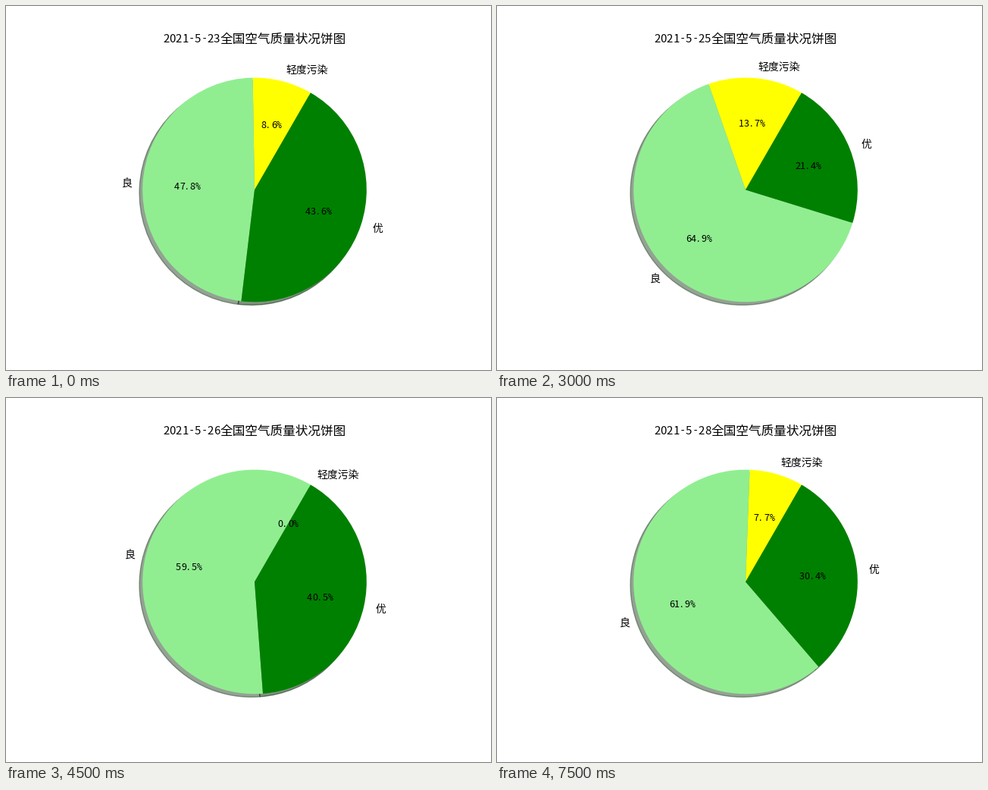
These frames come from a looping animation (640x480 px, 8000 ms). A matplotlib script:

```python
import matplotlib.pyplot as plt
from matplotlib.animation import FuncAnimation
from matplotlib.transforms import IdentityTransform

W, H, DPI = 640, 480, 100
CJK = "Noto Sans CJK JP"
MONO = "DejaVu Sans Mono"
TITLE = "全国空气质量状况饼图"
LABELS = ["轻度污染", "良", "优"]
COLORS = ["yellow", "lightgreen", "green"]

# Percent per day; the rest of each day is rated excellent
POLLUTED = [8.59, 17.86, 13.69, 0, 10.71, 7.74]
GOOD = [47.85, 66.67, 64.88, 59.52, 60.71, 61.9]
FIRST_DAY = 23

STEP = 500
FRAMES = 16
HOLD = 3  # steps each day stays on screen

# Pie centre and radius in pixels, from the default axes box
CX, CY, R = 0.5125 * W, 0.495 * H, 0.77 * H / 2.5

fig, ax = plt.subplots(figsize=(W / DPI, H / DPI), dpi=DPI)


def em(size):
    return size * DPI / 72


def put(x, y, text, family, size, ha="left"):
    ax.text(x, y, text, family=family, size=size, ha=ha, va="baseline",
            transform=IdentityTransform())


def half_width(left, y, text, size):
    """Set each character in a cell half an em wide."""
    cell = em(size) / 2
    for k, ch in enumerate(text):
        x = left + k * cell
        if ch == ".":
            put(x, y, ch, CJK, size * 0.9)
        elif ch.isdigit():
            put(x + cell / 2, y, ch, CJK, size * 0.9, "center")
        else:
            put(x + cell / 2, y, ch, MONO, size * 0.83, "center")


def draw_title(day):
    date = f"2021-5-{day}"
    date_width = len(date) * em(12) / 2
    left = CX - (date_width + len(TITLE) * em(12)) / 2
    base = 0.88 * H + em(6) + 1
    half_width(left, base, date, 12)
    put(left + date_width, base, TITLE, CJK, 12)


def draw(i):
    n = i // HOLD
    bad, good = POLLUTED[n], GOOD[n]
    ax.clear()
    _, names, shares = ax.pie(
        [bad, good, 100 - bad - good], labels=LABELS, colors=COLORS,
        autopct="%.1f%%", startangle=60, shadow=True)
    for t in names:
        t.set(family=CJK, size=10, x=t.get_position()[0] + 1 / R)
    for t in shares:
        x, y = t.get_position()
        text = t.get_text()
        t.remove()
        half_width(CX + R * x - len(text) * em(10) / 4, CY + R * y - 4.6,
                   text, 10)
    draw_title(FIRST_DAY + n)


anim = FuncAnimation(fig, draw, frames=FRAMES, init_func=lambda: None,
                     interval=STEP, repeat=True, repeat_delay=0)
plt.show()
```
